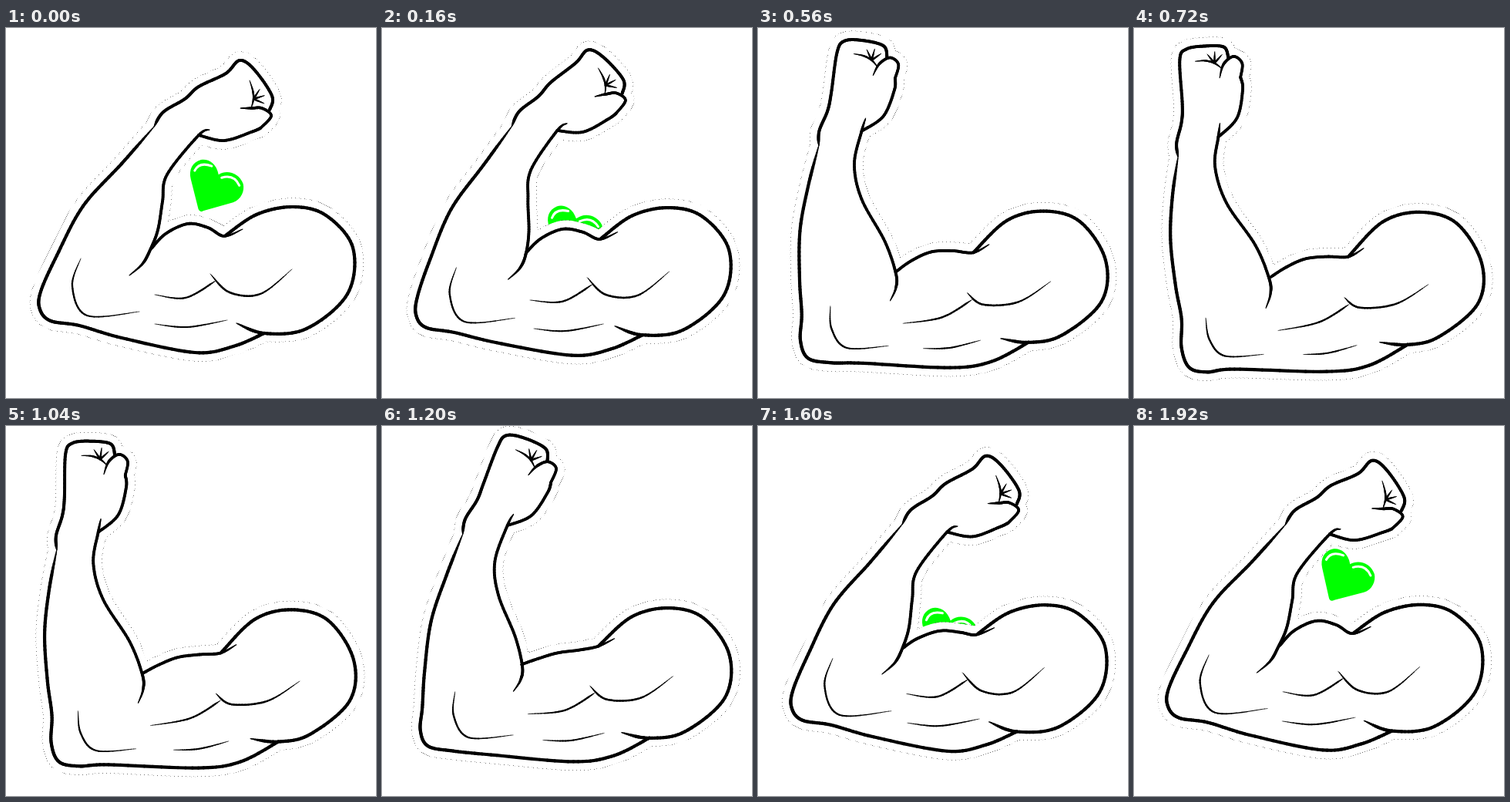
Animation, 480 px wide and 480 px high, one loop 2 s. Source, as an HTML page with a canvas:

```html
<!DOCTYPE html>
<html lang="en">
<head>
<meta charset="utf-8">
<title>Flexing arm</title>
<style>
html, body { margin: 0; height: 100%; overflow: hidden; background: #fff; }
canvas { display: block; width: 100vw; height: 100vh; }
</style>
</head>
<body>
<canvas id="stage" width="480" height="480"></canvas>
<script>
const ctx = document.getElementById('stage').getContext('2d');
const { PI, sin, cos, max, min, hypot, atan2 } = Math;
const LOOP = 2000, STEP = 80;
const ELBOW = [110, 340];

// Each line: key points with the arm flexed, then the same points with it open.
// Forearm and hand swing round the elbow.
const SWING = {
  outer: [
    [192,128, 150,176, 100,231, 66,295, 45,342, 44,365, 58,380, 95,386, 150,402, 245,421, 295,413, 335,396],
    [56,168, 49,220, 47,275, 54,335, 62,378, 62,415, 72,441, 95,447, 130,443, 250,446, 305,438, 355,411]],
  inner: [
    [264,132, 250,139, 209,190, 203,225, 197,262, 187,288, 177,306, 160,321],
    [110,124, 108,142, 104,180, 119,227, 157,282, 175,325, 177,345, 171,364]],
  back: [
    [192,128, 204,109, 232,92, 250,76, 285,59, 303,42, 322,54, 345,88, 342,106],
    [56,168, 54,150, 60,124, 61,100, 57,42, 66,28, 90,24, 114,25, 120,39]],
  thumb: [
    [304,104, 318,104, 332,104, 344,114, 330,130],
    [109,65, 114,47, 127,37, 138,46, 136,64]],
  palm: [
    [330,130, 318,135, 283,146, 250,139],
    [136,64, 139,80, 132,117, 108,142]],
  knuckles: [
    [316,68, 320,81, 321,92, 318,104],
    [77,44, 90,43, 102,46, 112,53]]
};
// Upper arm and muscle lines slide straight.
const SLIDE = {
  upper: [
    [299,383, 335,396, 390,390, 443,345, 450,285, 415,243, 372,232, 325,242, 285,269],
    [319,408, 355,411, 395,401, 446,358, 451,305, 418,253, 370,239, 322,252, 278,297]],
  biceps: [
    [187,288, 207,267, 236,254, 262,259, 283,270, 307,261],
    [175,325, 197,311, 222,300, 250,297, 278,297, 298,286]],
  elbow: [
    [97,299, 86,335, 105,373, 173,368],
    [93,377, 98,405, 118,426, 168,424]],
  fold: [
    [193,346, 233,350, 272,328],
    [187,393, 240,382, 279,359]],
  swell: [
    [265,319, 290,343, 330,345, 371,313],
    [273,350, 293,363, 340,358, 382,333]],
  low: [
    [193,384, 235,388, 287,379],
    [220,424, 252,422, 289,412]]
};

const lerp = (a, b, k) => a + (b - a) * k;
const slide = (p, q, k) => [lerp(p[0], q[0], k), lerp(p[1], q[1], k)];

function swing(p, q, k) {
  const [[r1, a1], [r2, a2]] = [p, q].map(([x, y]) => {
    const dx = x - ELBOW[0], dy = y - ELBOW[1];
    return [hypot(dx, dy), atan2(dy, dx)];
  });
  const turn = atan2(sin(a2 - a1), cos(a2 - a1));
  const r = lerp(r1, r2, k), a = a1 + turn * k;
  return [ELBOW[0] + r * cos(a), ELBOW[1] + r * sin(a)];
}

const pairs = flat =>
  Array.from({ length: flat.length / 2 }, (_, i) => flat.slice(2 * i, 2 * i + 2));

function pose(lines, move, k) {
  return Object.fromEntries(Object.entries(lines).map(([name, [flexed, open]]) => {
    const to = pairs(open);
    return [name, pairs(flexed).map((p, i) => move(p, to[i], k))];
  }));
}

// Points along a smooth curve
function curve(pts) {
  const out = [pts[0]], last = pts.length - 1;
  for (let i = 0; i < last; i++) {
    const a = pts[max(0, i - 1)], b = pts[i], c = pts[i + 1], d = pts[min(last, i + 2)];
    for (let n = 1; n <= 12; n++) {
      const s = n / 12;
      out.push([0, 1].map(j => b[j] + .5 * s * (c[j] - a[j]
        + s * (2 * a[j] - 5 * b[j] + 4 * c[j] - d[j] + s * (3 * (b[j] - c[j]) + d[j] - a[j])))));
    }
  }
  return out;
}

// Pen line; head and tail are the tapered shares of its length
function ink(pts, width, head = .001, tail = .001) {
  const c = curve(pts), n = c.length - 1;
  for (let i = 1; i <= n; i++) {
    const s = (i - .5) / n;
    ctx.lineWidth = width * min(1, .25 + s / head, .25 + (1 - s) / tail);
    ctx.beginPath();
    ctx.moveTo(...c[i - 1]);
    ctx.lineTo(...c[i]);
    ctx.stroke();
  }
}

// Sparse diagonal dots for the cut-out edge
const tile = document.createElement('canvas');
tile.width = tile.height = 5;
for (let y = 0; y < 5; y++) tile.getContext('2d').fillRect(y * 2 % 5, y, 1, 1);
const dots = ctx.createPattern(tile, 'repeat');

const heartShape = new Path2D('M273 192C270 176 258 171 250 173C239 176 234 186 237 198L247 237Q249 242 254 239L292 228C303 224 307 213 305 204C300 190 284 185 273 192Z');
const heartShine = new Path2D('M242 187Q248 175 264 181M277 196Q293 191 300 206');

// The heart is tossed up from behind the biceps and falls back
function drawHeart(t) {
  const s = (t + LOOP - 885) % LOOP - LOOP / 2;
  const y = .00092 * s * s - 14;
  if (y > 100) return;
  ctx.save();
  ctx.translate(272 - .38 * y, 207 + y);
  ctx.rotate(-.0023 * y);
  ctx.translate(-270, -207);
  ctx.fillStyle = '#0f0';
  ctx.fill(heartShape);
  ctx.strokeStyle = '#fff';
  ctx.lineWidth = 3;
  ctx.stroke(heartShine);
  ctx.restore();
}

function drawArm(t) {
  // The way back runs ahead of the way out, with the biceps still slack
  const lead = max(0, sin(PI * (t - 800) / 1150));
  const reach = .52 - .55 * cos(PI * t / 1000 + .33 + .55 * lead);
  const { outer, inner, back, thumb, palm, knuckles } = pose(SWING, swing, reach);
  const { upper, biceps, elbow, fold, swell, low } = pose(SLIDE, slide, reach);
  for (let i = 1; i < 4; i++) biceps[i][1] += 19 * lead ** 3 * sin(PI * i / 4);

  const body = new Path2D();
  [back, thumb.slice(2), palm, inner.slice(1, 6), biceps.slice(0, 5),
    upper.slice(1).reverse(), outer.slice().reverse()]
    .flatMap(curve).forEach(p => body.lineTo(...p));
  body.closePath();
  ctx.strokeStyle = dots;
  ctx.lineWidth = 23;
  ctx.stroke(body);
  ctx.strokeStyle = ctx.fillStyle = '#fff';
  ctx.lineWidth = 22;
  ctx.stroke(body);
  ctx.fill(body);

  ctx.strokeStyle = '#000';
  ink(back, 4, .08);
  ink(thumb, 3.6, .35);
  ink(palm, 3.8);
  ink(outer, 4.2, .08);
  ink(upper, 4.2, .1);
  ink(biceps, 3.8, .05, .3);
  ink(inner, 3.8, .2, .25);
  ink(elbow, 2.3, .4, .5);
  ink(fold, 2.3, .6, .2);
  ink(swell, 2.5, .25, .5);
  ink(low, 2, .5, .5);
  ink(knuckles, 2.4, .5, .4);
  const [x, y] = knuckles[2];
  for (const spread of [-.7, 0, .7]) {
    const a = spread - .3 - 1.26 * reach;
    ink([[x, y], [x + 15 * cos(a), y + 15 * sin(a)]], 2.4, .001, .8);
  }
}

function draw(now) {
  const t = Math.floor(now % LOOP / STEP) * STEP;
  ctx.fillStyle = '#fff';
  ctx.fillRect(0, 0, 480, 480);
  ctx.lineCap = ctx.lineJoin = 'round';
  drawHeart(t);
  drawArm(t);
  requestAnimationFrame(draw);
}
draw(performance.now());
</script>
</body>
</html>
```
